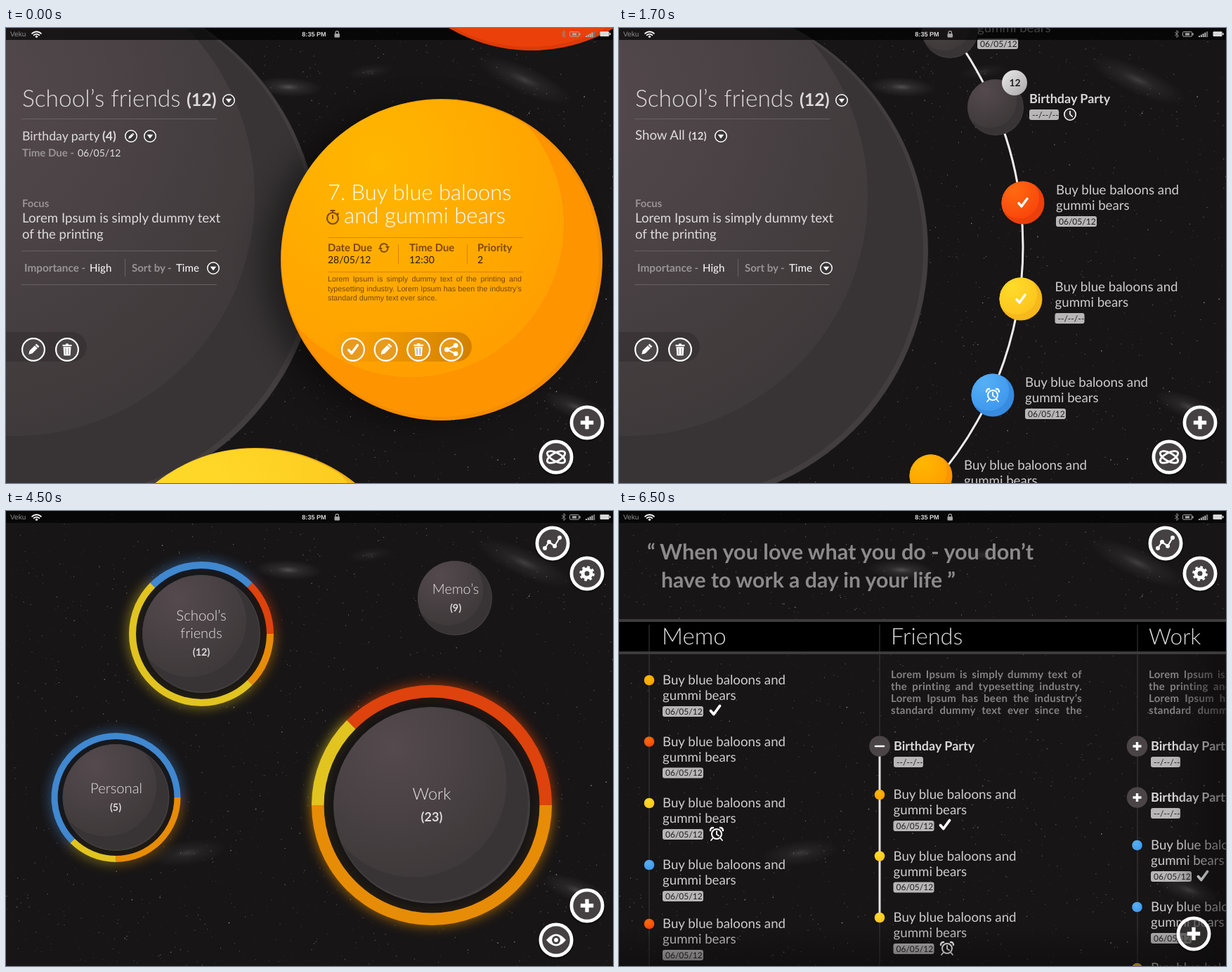
Write an HTML page with a canvas that moves like this. It is 864 px wide and 648 px high and loops after 8000 ms.

```html
<!DOCTYPE html>
<html lang="en">
<head>
<meta charset="utf-8">
<title>Planet tasks</title>
<style>
html, body { margin: 0; width: 100%; height: 100%; overflow: hidden; background: #171516; }
canvas, svg { position: absolute; left: 0; top: 0; display: block; }
svg { font-family: Lato, "Open Sans", sans-serif; text-rendering: geometricPrecision; }
.l { font-weight: 300; }
.b { font-weight: 700; }
.m { text-anchor: middle; }
.e { text-anchor: end; }
.a { font-family: "Liberation Sans", Arial, sans-serif; }
.i { fill: none; stroke: #fff; stroke-linecap: round; stroke-linejoin: round; }
p { margin: 0; text-align: justify; text-align-last: justify; }
.note { font: 10.75px/13.5px "Liberation Sans", Arial, sans-serif; color: #754800; }
.note span { display: block; text-align-last: left; }
.blurb { font: 700 15px/17.1px Lato, sans-serif; letter-spacing: .3px; color: #858283; }
.s { visibility: hidden; animation: 8s step-end infinite; }
.s0 { animation-name: k0; }
.s1 { animation-name: k1; }
.s2 { animation-name: k2; }
.s3 { animation-name: k3; }
.s4 { animation-name: k4; }
@keyframes k0 { 0% { visibility: visible } 6.25%, 100% { visibility: hidden } }
@keyframes k1 { 0% { visibility: hidden } 6.25% { visibility: visible } 31.25%, 100% { visibility: hidden } }
@keyframes k2 { 0% { visibility: hidden } 31.25% { visibility: visible } 56.25%, 100% { visibility: hidden } }
@keyframes k3 { 0% { visibility: hidden } 56.25% { visibility: visible } 81.25%, 100% { visibility: hidden } }
@keyframes k4 { 0% { visibility: hidden } 81.25%, 100% { visibility: visible } }
</style>
</head>
<body>
<canvas id="sky" width="864" height="648"></canvas>
<div id="app"></div>
<script>
// Seeded star field
const ctx = document.getElementById('sky').getContext('2d');
let seed = 7;
const rnd = () => (seed = seed * 16807 % 2147483647) / 2147483647;
ctx.fillStyle = '#171516';
ctx.fillRect(0, 0, 864, 648);
for (let n = 0; n < 2800; n++) {
  const size = rnd() < .08 ? 1.5 : 1;
  ctx.fillStyle = `rgba(225,215,210,${.06 + .55 * rnd() ** 3.5})`;
  ctx.fillRect(rnd() * 864, rnd() * 648, size, size);
}

const tones = {
  gray: ['#554a4e', '#3e393a', '#383435', '#423d3e'],
  orange: ['#ffb700', '#ff9f00', '#fd9400', '#f58d00'],
  red: ['#ff6a10', '#f9470c', '#ec400a', '#dd3a08'],
  yellow: ['#ffdc2a', '#fdc51e', '#f6b81a', '#eeac14'],
  blue: ['#56b0f6', '#3f98ed', '#388ce0', '#3080d2'],
};
const bar = { red: '#e8430d', yellow: '#f0d015', blue: '#3b8fe2', orange: '#f09208' };
const glow = { red: '#de420d', yellow: '#e1c420', blue: '#4088d0', orange: '#e78c06' };

let uid = 0;
const t = (x, y, size, str, cls = '', fill = '#dedbdc') =>
  `<text x="${x}" y="${y}" font-size="${size}" class="${cls}" fill="${fill}">${str}</text>`;
const disc = (x, y, r, fill, more = '') => `<circle cx="${x}" cy="${y}" r="${r}" fill="${fill}" ${more}/>`;
const rect = (x, y, w, h, fill, more = '') =>
  `<rect x="${x}" y="${y}" width="${w}" height="${h}" fill="${fill}" ${more}/>`;
const line = (d, color, w = 1) => `<path d="${d}" fill="none" stroke="${color}" stroke-width="${w}"/>`;
const at = (x, y, body, k = 1) => `<g transform="translate(${x} ${y}) scale(${k})">${body}</g>`;
const scene = (n, body) => `<g class="s s${n}">${body}</g>`;
const para = (x, y, w, cls, body) =>
  `<foreignObject x="${x}" y="${y}" width="${w}" height="90"><p class="${cls}">${body}</p></foreignObject>`;

// The body touches the upper left edge, so the rim shows at the lower right
function planet(x, y, r, tone, lit = [x - .19 * r, y - .22 * r, .95 * r]) {
  const [, , body, rim] = tones[tone], id = 'c' + uid++, d = Math.min(4, r * .013);
  const inner = [x - d * .7, y - d * .7, r - d];
  return `<clipPath id="${id}">${disc(...inner)}</clipPath>` + disc(x, y, r, rim) + disc(...inner, body) +
    disc(...lit, `url(#${tone})`, `clip-path="url(#${id})"`);
}

const stroke = (d, w) => `<path class="i" d="${d}" stroke-width="${w}"/>`;
const solid = (d, fill = '#fff') => `<path d="${d}" fill="${fill}"/>`;
const icon = {
  plus: line('M-8 0H8M0-8V8', '#fff', 4.6),
  minus: stroke('M-6 0H6', 2.6),
  cross: stroke('M-6-6L6 6M6-6L-6 6', 3.8),
  check: stroke('M-6 .5L-2 5L6-6', 3.4),
  down: solid('M-4.5-2.5H4.5L0 3.8Z'),
  pencil: `<g transform="rotate(45)">${solid('M-2.8-5.5H2.8V5L0 9.5L-2.8 5ZM-2.8-9H2.8V-6.5H-2.8Z')}</g>`,
  trash: solid('M-6.5-7H-2V-8.5H2V-7H6.5V-4.8H-6.5ZM-5.5-3.8H5.5L4.6 8.5H-4.6Z') +
    line('M-2-2V7M2-2V7', '#777', .9),
  share: stroke('M6-5.5L-6 0L6 5.5', 2) + disc(-6, 0, 3.4, '#fff') + disc(6, -5.5, 3.2, '#fff') + disc(6, 5.5, 3.2, '#fff'),
  alarm: disc(0, 0, 7, 'none', 'stroke="#fff" stroke-width="2"') +
    stroke('M0-4V.5L3 2.5M-5.5 6L-8 9M5.5 6L8 9', 1.8) + stroke('M-9-5Q-9-9-5-9M9-5Q9-9 5-9', 2.4),
  clock: stroke('M0-4.5V0L3.2 3', 1.7),
  graph: stroke('M-11 7L-5-2L3 4L10-8', 2.2) +
    [[-11, 7], [-5, -2], [3, 4], [10, -8]].map(q => disc(...q, 3, '#fff')).join(''),
  gear: disc(0, 0, 6, 'none', 'stroke="#fff" stroke-width="5"') +
    disc(0, 0, 9, 'none', 'stroke="#fff" stroke-width="3.6" stroke-dasharray="3.53 3.54"'),
  eye: solid('M-14 0Q0-17 14 0Q0 17-14 0Z') + disc(0, 0, 6, '#454142') + disc(0, 0, 3, '#fff'),
  orbit: [28, -28].map(a => `<ellipse class="i" rx="14" ry="6" stroke-width="2.8" transform="rotate(${a})"/>`).join(''),
};
const btn = (x, y, r, w, name, k = 1, fill = '#454142') =>
  disc(x, y, r - w / 2, fill, `stroke="#fff" stroke-width="${w}"`) + at(x, y, icon[name], k);
const big = (x, y, name, k = 1, fill = '#454142') =>
  disc(x, y + 1, 25, 'none', 'stroke="#000" stroke-width="2" opacity=".35"') + btn(x, y, 24.5, 4.8, name, k, fill);
const mid = (x, y, name, fill = '#4b4647', k = 1) => btn(x, y, 17, 2.2, name, k, fill);
const drop = (x, y) => btn(x, y, 9, 1.5, 'down', .95, '#3a3536');

const tag = (x, y, date) => rect(x, y, date ? 58 : 42, 15, '#b9b6b7', 'rx="3"') +
  t(x + 4, y + 11.7, 12, date ? '06/05/12' : '--/--/--', '', '#221f20');
const task = (x, y, date = true) => t(x, y, 18.7, 'Buy blue baloons and', '', '#cfcccd') +
  t(x, y + 22, 18.7, 'gummi bears', '', '#cfcccd') + tag(x, y + 31, date);
const party = (x, y) => t(x, y, 18, 'Birthday Party', 'b', '#dad7d8') + tag(x, y + 9, false);

// Left panel
const soft = '#999395', rule = '#676163';
const panel = sub => t(23, 112, 33.5, 'School’s friends', 'l') + t(257, 111, 25, '(12)', 'b') + drop(317, 103) +
  line('M22 129.5H300M22 317.5H300M22 365.5H300M169.5 329V354', rule) + sub +
  t(23, 255, 14.8, 'Focus', 'b', soft) +
  t(23, 277, 18.7, 'Lorem Ipsum is simply dummy text') + t(23, 300, 18.5, 'of the printing') +
  t(26, 347, 15.3, 'Importance -', 'b', soft) + t(119, 347, 15.1, 'High', '', '#fff') +
  t(179, 347, 15, 'Sort by -', 'b', soft) + t(242, 347, 15.1, 'Time', '', '#fff') + drop(295, 342) +
  rect(-20, 433, 135, 42, '#000', 'rx="21" opacity=".16"') + mid(39, 458, 'pencil') + mid(87, 458, 'trash');
const corner = name => big(827, 562, 'plus', 1.15) + big(783, 611, name);

const lit = [12, 239, 342];
const brown = '#7c4a00', dark = '#2d1b00';
const dueBlock = (x, label, value) => t(x, 318, 14.9, label, 'b', brown) + t(x, 335, 14, value, '', dark);
const detail = scene(0,
  planet(77, 307, 369, 'gray', lit) +
  planet(355, 825, 227, 'yellow') +
  disc(592, 336, 226, '#000', 'opacity=".42" filter="url(#blur20)"') +
  planet(620, 330, 229, 'orange') +
  panel(t(23, 160, 17.7, 'Birthday party') + t(137, 160, 17.6, '(4)', 'b') +
    btn(178, 154, 9, 1.5, 'pencil', .55, '#3a3536') + drop(205, 154) +
    t(23, 183, 15, 'Time Due -', 'b', soft) + t(102, 183, 14, '06/05/12')) +
  t(458, 245, 30.9, '7. Buy blue baloons', 'l', '#fff') + t(481, 278, 31.3, 'and gummi bears', 'l', '#fff') +
  disc(465, 271, 8, 'none', `stroke="${brown}" stroke-width="2.2"`) +
  line('M465 266V272M461.5 260H468.5M465 260V263M471.5 263.5L473.5 265.5', brown, 2) +
  line('M458 298.5H736M458 347.5H736M558.5 308V336M656.5 308V336', '#dc8200') +
  dueBlock(458, 'Date Due', '28/05/12') + dueBlock(574, 'Time Due', '12:30') + dueBlock(671, 'Priority', '2') +
  line('M532.5 312A5.5 5.5 0 0 1 543 310.5M543.5 314A5.5 5.5 0 0 1 533 315.5', brown, 1.8) +
  solid('M540 311H546L543.5 315ZM530 315H536L532.5 311Z', brown) +
  para(458, 352, 276, 'note', 'Lorem Ipsum is simply dummy text of the printing and<br>typesetting industry. Lorem Ipsum has been the industry’s<span>standard dummy text ever since.</span>') +
  rect(462, 433, 201, 42, 'url(#pill)', 'rx="21"') +
  ['check', 'pencil', 'trash', 'share'].map((n, i) => mid(494 + i * 46.6, 458, n, '#e89a1e', 1.05)).join('') +
  corner('orbit'));

const stops = [[575, 249, 'red', 'check'], [572, 386, 'yellow', 'check'], [532, 523, 'blue', 'alarm'], [444, 638, 'orange']];
const timeline = scene(1,
  planet(80, 318, 360, 'gray', lit) +
  panel(t(23, 159, 18.7, 'Show All') + t(99, 159, 15, '(12)', 'b') + drop(145, 154)) +
  disc(66, 311, 509, 'none', 'stroke="#f1efef" stroke-width="3" clip-path="url(#right)"') +
  planet(471, 3, 40, 'gray') + planet(536, 113, 40, 'gray') +
  disc(563, 78, 18, 'url(#badge)') + t(563.5, 82.5, 14, '12', 'b m', '#222') +
  stops.map(([x, y, tone, mark]) => planet(x, y, 30.5, tone) + (mark ? at(x, y, icon[mark]) : '')).join('') +
  task(510, -16) + party(584, 107) + btn(642, 123, 9, 1.6, 'clock', 1, '#2a2728') +
  task(622, 237) + task(620.5, 375, false) + task(578, 511) + task(491, 629) +
  corner('orbit'));

// Calendar
const colX = [19, 138, 257, 376, 494.5], rowY = [113, 207.3, 301.7, 396, 490.2];
const days = [[28, 29, 30, 1, 2], [5, 6, 7, 8, 9], [12, 13, 14, 15, ''], [19, 20, 21, 22, 23], [26, 27, 28, 29, 30]];
const cell = '#3e393a', num = '#928d8e';
const grid = rowY.map((y, r) => days[r].map((d, c) =>
  rect(colX[c], y, d ? 113 : 120, 88.4, cell, !r && c < 3 ? 'opacity=".5"' : '') +
  t(colX[c] + 104.5, y + 24.5, 20.5, d, 'e', num)).join('') +
  rect(815, y, 49, 88.4, cell, r === 4 ? 'opacity=".5"' : '')).join('');
const count = (x, y, n) => disc(x, y, 22, '#817d7e') + t(x, y + 8.5, 24, n, 'b m', '#252223');
const words = ['morning meeting ver since the', 'when annknown printer ook a', 'galley of ype and scrambled it to', 'maked a type specimen book'];
const card = (y, tone) => rect(623, y, 177, 83, '#d8d8cd') + rect(623, y + 79, 177, 4, bar[tone]) +
  t(628, y + 14, 12.3, '9:00', 'b', '#111') + words.map((w, i) => t(628, y + 28 + i * 13.1, 12, w, '', '#1c1a1a')).join('');
const calendar = scene(2,
  t(26, 48, 23.3, '2012', 'b', '#fff') + t(23, 85, 34, 'December', 'l') + t(186, 84, 25, '(12)', 'b') +
  t(23, 630, 34.3, 'January', 'l') + t(145, 629, 25, '(3)', 'b') +
  grid + rect(613, 113, 196, 465.5, cell) +
  count(193, 252, 2) + count(432, 441, 1) + count(193, 535, 1) +
  mid(534, 345, 'plus') + mid(581, 345, 'cross') +
  t(628, 137.5, 20.8, '23 Tasks', '', '#f4f2f2') + t(797, 137.5, 20.5, '16', 'e', num) +
  `<g clip-path="url(#list)">${['red', 'yellow', 'blue', 'orange', 'red'].map((c, i) => card(149 + i * 92, c)).join('')}</g>` +
  rect(623, 147, 177, 22, 'url(#fall)') + rect(623, 548, 177, 21, 'url(#rise)') +
  big(696, 45, 'plus', 1.15) + big(761, 45, 'graph') + big(827, 45, 'gear'));

// Ring charts: segments are [colour, start, end] in degrees
const arc = (x, y, r, a, b) => {
  const p = d => `${x + r * Math.cos(d * Math.PI / 180)} ${y + r * Math.sin(d * Math.PI / 180)}`;
  return `M${p(a)}A${r} ${r} 0 ${b - a > 180 ? 1 : 0} 1 ${p(b)}`;
};
function ring(x, y, r, w, inner, parts) {
  const segs = parts.map(([c, a, b]) => line(arc(x, y, r - w / 2, a, b), glow[c], w)).join('');
  return `<g filter="url(#blur9)" opacity=".75">${segs}</g>` +
    disc(x, y, r - w, '#151314', 'opacity=".8"') + planet(x, y, inner, 'gray') + segs;
}
const label = (x, y, size, str) => t(x, y, size, str, 'l m', '#e6e3e4');
const total = (x, y, size, str) => t(x, y, size, str, 'b m');
const overview = scene(3,
  ring(278, 175, 103, 10, 84, [['blue', 225, 315], ['red', 315, 360], ['orange', 0, 45], ['yellow', 45, 225]]) +
  ring(156.5, 408, 92, 9, 76, [['blue', 135, 360], ['orange', 0, 90], ['yellow', 90, 135]]) +
  ring(606, 419, 171, 17.5, 140, [['red', 225, 360], ['yellow', 180, 225], ['orange', 0, 180]]) +
  planet(639, 124, 53, 'gray') +
  label(278, 156, 20.4, 'School’s') + label(278, 181, 20, 'friends') + total(278, 206, 14.4, '(12)') +
  label(157, 402, 20.2, 'Personal') + total(156, 427, 14.4, '(5)') +
  label(606, 411, 23.3, 'Work') + total(606, 442, 18, '(23)') +
  label(640, 118, 19.8, 'Memo’s') + total(640, 143, 14.4, '(9)') +
  big(778, 46, 'graph') + big(827, 89, 'gear') + corner('eye'));

// Board
const blurb = 'Lorem Ipsum is simply dummy text of<br>the printing and typesetting industry.<br>Lorem Ipsum has been the industry’s<br>standard dummy text ever since the';
const dot = (x, y, tone) => disc(x, y, 7.3, `url(#${tone})`);
const knob = (x, y, name, k) => disc(x, y, 14.8, '#4b4446') + at(x, y, icon[name], k);
const memos = [[247, 'orange'], [334.5, 'red'], [422, 'yellow'], [510, 'blue'], [594, 'red']];
const board = scene(4,
  t(40, 69, 30.3, '“', 'b', '#8d8a8b') + t(58, 69, 30.6, 'When you love what you do - you don’t', 'b', '#8d8a8b') +
  t(60, 109, 30.2, 'have to work a day in your life ”', 'b', '#8d8a8b') +
  rect(0, 154, 864, 50, '#3d3b3c') + rect(0, 158, 864, 42, '#000') +
  line('M43 162V648M371 162V648M738 162V648', '#3f3c3d') +
  t(61, 190, 33, 'Memo', 'l') + t(387, 190, 32.6, 'Friends', 'l') + t(754, 190, 31.6, 'Work', 'l') +
  memos.map(([y, tone]) => dot(43, y - 6, tone) + task(62, y)).join('') +
  at(137, 284, icon.check, 1.1) + at(139, 460, icon.alarm) +
  para(387, 225, 272, 'blurb', blurb) + para(754, 225, 272, 'blurb', blurb) +
  line('M371 340V579', '#e4e2e2', 3) + knob(371, 335, 'minus', 1) + party(391, 341) +
  [[410, 'orange'], [497.5, 'yellow'], [585, 'yellow']].map(([y, tone]) => dot(371, y - 6, tone) + task(390.5, y)).join('') +
  at(464, 447, icon.check, 1.1) + at(467, 623, icon.alarm) +
  [341, 414].map(y => knob(737.5, y - 6, 'plus', .75) + party(757, y)).join('') +
  [[482, 'blue'], [570, 'blue'], [657, 'yellow']].map(([y, tone]) => dot(737.5, y - 6, tone) + task(757, y)).join('') +
  at(831, 520, icon.check, 1.1) +
  rect(790, 204, 74, 444, 'url(#side)') + rect(0, 590, 864, 58, 'url(#foot)') +
  big(778, 46, 'graph') + big(827, 89, 'gear') + big(818, 602, 'plus', 1.15, 'rgba(69,65,66,.6)'));

// Status bar; the red planet of the first scene lies between its shade and its icons
const status = rect(0, 0, 864, 17, '#000', 'opacity=".68"') + scene(0, planet(748, -201, 233, 'red')) +
  t(6, 12, 10, 'Veku', 'a', '#908d8e') + t(438.5, 12, 9.1, '8:35 PM', 'a b m', '#d8d6d6') +
  at(43.5, 13, stroke('M-6.3-5.2A9 9 0 0 1 6.3-5.2M-3.8-2.8A5.4 5.4 0 0 1 3.8-2.8', 1.9) + disc(0, -.8, 1.6, '#fff')) +
  rect(467.5, 8, 7.5, 5.5, '#a5a3a3', 'rx="1"') + line('M469 8V6.5A2.2 2.2 0 0 1 473.4 6.5V8', '#a5a3a3', 1.3) +
  line('M791 5.8L796.5 11L794 13.5V3.5L796.5 6L791 11.2', '#8f8c8d') +
  rect(802.5, 5.5, 13, 6.5, 'none', 'rx="1" stroke="#aaa"') + rect(806, 7.2, 6, 3.2, '#aaa') + rect(816.3, 7.3, 1.4, 3, '#aaa') +
  [0, 1, 2, 3, 4].map(n => rect(825 + n * 2.8, 11 - n * 1.5, 2, 2 + n * 1.5, n < 4 ? '#b5b3b3' : '#777')).join('') +
  rect(845.5, 5, 13, 7, '#d8d8d8', 'rx="1.2"') + rect(859, 7, 1.6, 3, '#d8d8d8');

const ramp = (id, dir, color, a, b) => `<linearGradient id="${id}" ${dir}><stop stop-color="${color}" stop-opacity="${a}"/><stop offset="1" stop-color="${color}" stop-opacity="${b}"/></linearGradient>`;
const blur = (id, n) => `<filter id="${id}" x="-30%" y="-30%" width="160%" height="160%"><feGaussianBlur stdDeviation="${n}"/></filter>`;
const down = 'x2="0" y2="1"';
const defs = '<defs>' + Object.entries(tones).map(([id, [a, b]]) =>
  `<radialGradient id="${id}" cx=".39" cy=".3" r=".72"><stop stop-color="${a}"/><stop offset="1" stop-color="${b}"/></radialGradient>`).join('') +
  '<radialGradient id="neb"><stop stop-color="#b5b0ae" stop-opacity=".38"/><stop offset=".35" stop-color="#8f8b8a" stop-opacity=".18"/><stop offset="1" stop-color="#8f8b8a" stop-opacity="0"/></radialGradient>' +
  '<linearGradient id="badge" x2="1" y2="1"><stop stop-color="#ececec"/><stop offset="1" stop-color="#a9a6a7"/></linearGradient>' +
  ramp('pill', '', '#7a4300', 0, .34) + ramp('fall', down, '#000', .75, 0) + ramp('rise', down, '#000', 0, .7) +
  ramp('side', '', '#0b0a0a', 0, .6) + ramp('foot', down, '#0b0a0a', 0, .5) + blur('blur9', 9) + blur('blur20', 20) +
  `<clipPath id="right">${rect(440, 0, 424, 648)}</clipPath><clipPath id="list">${rect(623, 149, 177, 419)}</clipPath></defs>`;
const cloud = (x, y, rx, ry, a, o) =>
  `<ellipse rx="${rx}" ry="${ry}" fill="url(#neb)" opacity="${o}" transform="translate(${x} ${y}) rotate(${a})"/>`;
const sky = cloud(402, 84, 48, 14, 3, 1) + cloud(518, 62, 34, 10, -8, .4) + cloud(738, 74, 74, 20, 24, .7) +
  cloud(258, 487, 56, 18, -8, .6) + cloud(812, 540, 52, 17, 20, .8);

document.getElementById('app').innerHTML =
  `<svg width="864" height="648" viewBox="0 0 864 648">${defs}${sky}${detail}${timeline}${calendar}${overview}${board}${status}</svg>`;
</script>
</body>
</html>
```
